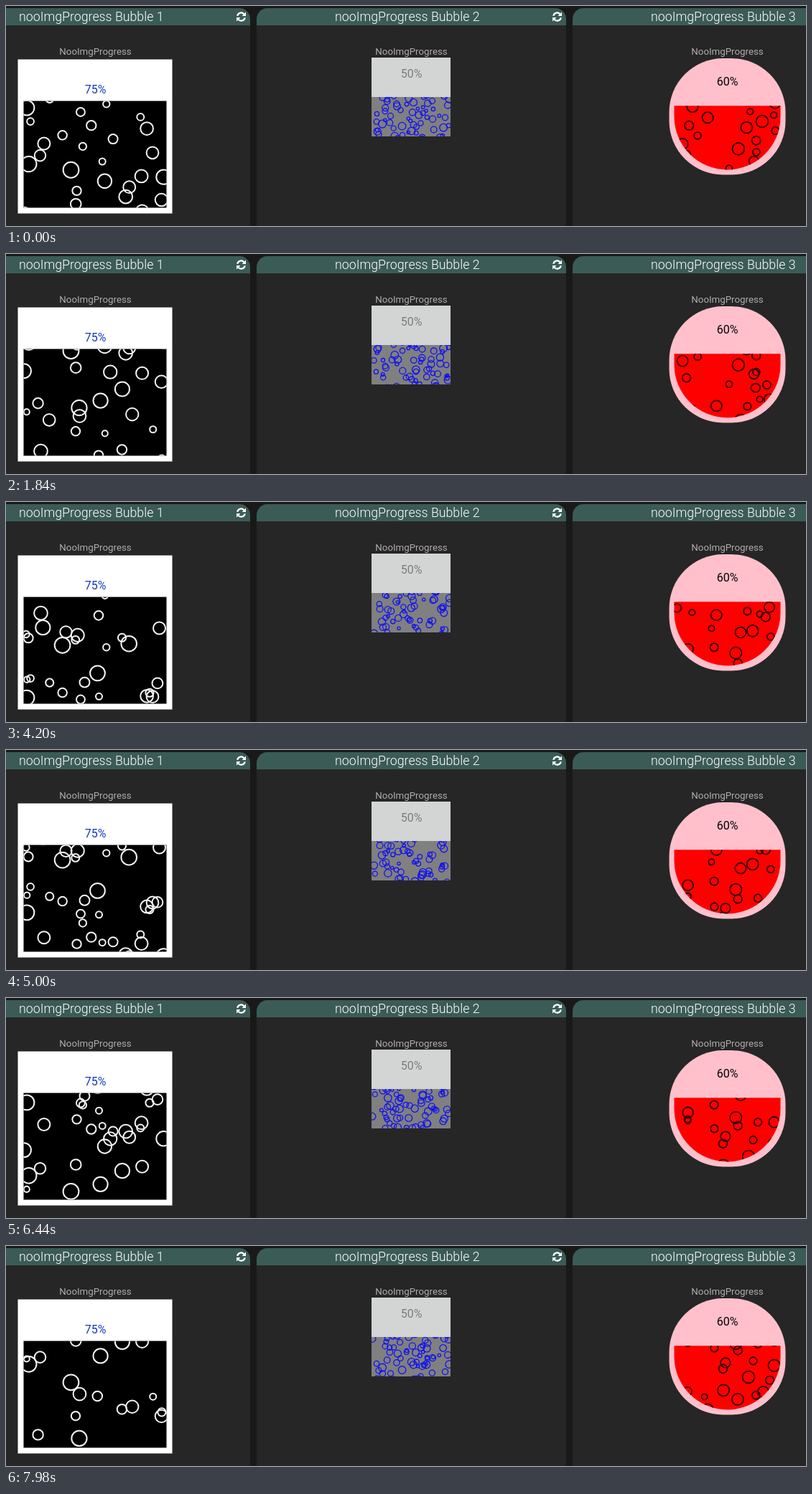
An HTML page that plays this animation: 1114 by 307 pixels, repeating every 8000 ms.

```html
<!DOCTYPE html>
<html lang="en">
<head>
<meta charset="utf-8">
<title>Bubble progress</title>
<style>
  html, body { margin: 0; width: 100%; height: 100%; overflow: hidden; background: #191919; }
  svg { display: block; width: 1114px; height: 307px; font-family: Roboto, sans-serif; text-anchor: middle; }
  .title { font-size: 17.75px; font-weight: 300; fill: #fff; }
  .label { font-size: 13.3px; fill: #b0acac; }
  .value { font-size: 16px; }
  .bubbles { fill: none; }
</style>
</head>
<body>
<svg viewBox="0 0 1114 307">
  <defs>
    <clipPath id="clip1"><rect x="24.5" y="132.5" width="199" height="149"/></clipPath>
    <clipPath id="clip2"><rect x="509" y="127" width="110" height="55"/></clipPath>
    <clipPath id="clip3"><path d="M930.5 139.2H1078.5V154.5A74 74 0 0 1 930.5 154.5Z"/></clipPath>
    <g id="refresh">
      <path d="M-5.3 -1.2A5.3 5.3 0 0 1 4 -3.6M5.3 1.2A5.3 5.3 0 0 1 -4 3.6" fill="none" stroke="#fff" stroke-width="2.2"/>
      <path d="M6.5 -6.5V-1H1ZM-6.5 6.5V1H-1Z" fill="#fff"/>
    </g>
  </defs>
  <g id="panels"></g>

  <rect x="16.5" y="74.5" width="215" height="215" fill="#fff"/>
  <rect x="24.5" y="132.5" width="199" height="149"/>
  <g clip-path="url(#clip1)"><g id="white" class="bubbles" stroke="#f4f4f4" stroke-width="2"/></g>
  <text class="value" x="124.5" y="122" fill="#1038c4">75%</text>

  <rect x="509" y="72" width="110" height="110" fill="#d3d5d4"/>
  <rect x="509" y="127" width="110" height="55" fill="#808080"/>
  <g clip-path="url(#clip2)"><g id="blue" class="bubbles" stroke="#1212ee" stroke-width="1.3"/></g>
  <text class="value" x="564.5" y="100" fill="#7c7c7c">50%</text>

  <rect x="923.5" y="73" width="162" height="162.5" rx="75" fill="#ffc0cb"/>
  <g clip-path="url(#clip3)">
    <rect x="930" y="139" width="149" height="90" fill="#f00"/>
    <g id="dark" class="bubbles" stroke="#260000" stroke-width="1.7"/>
  </g>
  <text class="value" x="1004.5" y="111">60%</text>
</svg>
<script>
const SVG_NS = 'http://www.w3.org/2000/svg';
const LOOP = 8000;
const STEPS = 119;
const GOLDEN = 0.618034;

function add(parent, tag, attributes, text = '') {
  const node = document.createElementNS(SVG_NS, tag);
  for (const key in attributes) node.setAttribute(key, attributes[key]);
  node.textContent = text;
  parent.append(node);
  return node;
}

function seeded(seed) {
  return () => (seed = (seed * 16807) % 2147483647) / 2147483647;
}

const mix = ([low, high], amount) => low + (high - low) * amount;

function drawPanel(index) {
  const panels = document.getElementById('panels');
  const left = 349 + 440 * (index - 2);
  const center = 564.5 + 440 * (index - 2);
  const right = left + 431;
  add(panels, 'path', { d: `M${left} 307V27H${right}V307Z`, fill: '#262626' });
  add(panels, 'path', { d: `M${left} 27V18A15 15 0 0 1 ${left + 15} 3H${right - 15}A15 15 0 0 1 ${right} 18V27Z`, fill: '#3b5b56' });
  add(panels, 'text', { class: 'title', x: center - 5.7, y: 21 }, `nooImgProgress Bubble ${index}`);
  add(panels, 'text', { class: 'label', x: center, y: 68 }, 'NooImgProgress');
  add(panels, 'use', { href: '#refresh', x: right - 12.5, y: 15 });
}

// Bubbles rise at their own steady speed and re-enter at the floor after
// travelling `span`. Golden-ratio steps keep them evenly spread.
function makeGroup({ id, seed, count, x, radius, speed, floor, span }) {
  const parent = document.getElementById(id);
  const random = seeded(seed);
  const bubbles = Array.from({ length: count }, (_, i) => {
    const across = (i * GOLDEN + random() * 0.3) % 1;
    const node = add(parent, 'circle', { cx: mix(x, across), r: mix(radius, random()) });
    return { node, start: span * (i + random()) / count, speed: mix(speed, random()) };
  });
  return seconds => {
    for (const bubble of bubbles) {
      const risen = (bubble.start + bubble.speed * seconds) % span;
      bubble.node.setAttribute('cy', floor - risen);
    }
  };
}

[1, 2, 3].forEach(drawPanel);
const groups = [
  { id: 'white', seed: 4127, count: 60, x: [23, 222], radius: [4, 11], speed: [49, 74], floor: 293, span: 370 },
  { id: 'blue', seed: 9051, count: 190, x: [510, 618], radius: [2, 5.4], speed: [19, 28], floor: 188, span: 206 },
  { id: 'dark', seed: 733, count: 52, x: [934, 1076], radius: [4, 8.5], speed: [19, 27], floor: 238, span: 277 }
].map(makeGroup);

function render(time) {
  const step = Math.floor((time % LOOP) / LOOP * STEPS);
  const seconds = step / STEPS * LOOP / 1000;
  groups.forEach(update => update(seconds));
}

const begin = performance.now();
function tick(now) {
  render(Math.max(0, now - begin));
  requestAnimationFrame(tick);
}
render(0);
requestAnimationFrame(tick);
</script>
</body>
</html>
```
